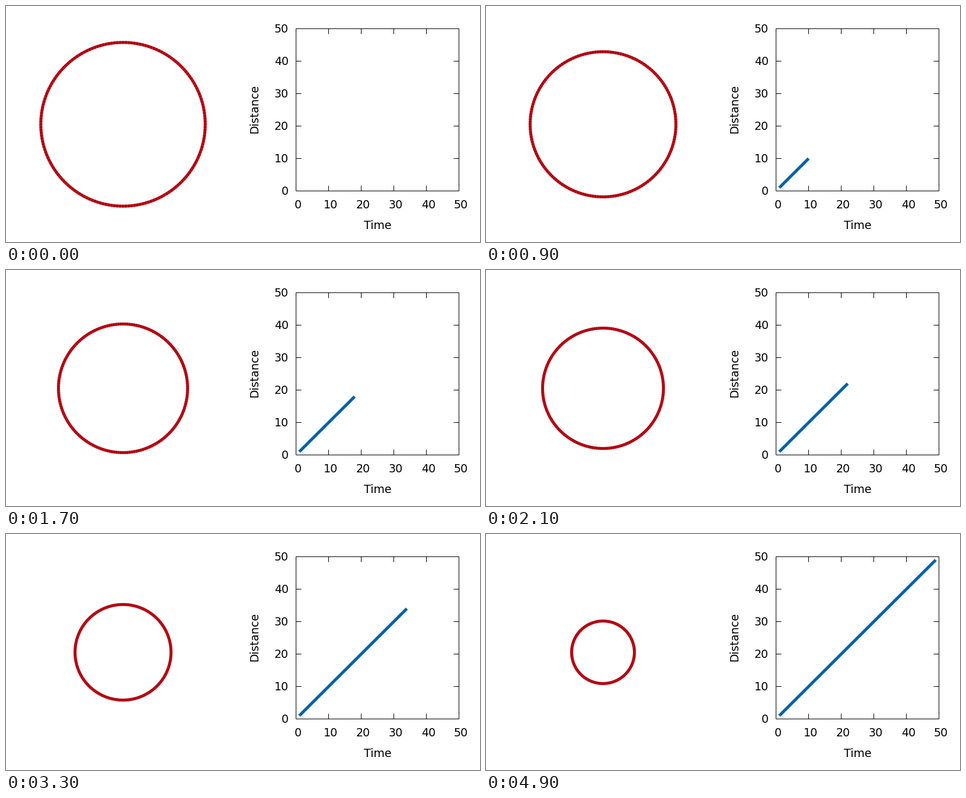
Animation, 800 px wide and 400 px high, one loop 5000 ms. Source, as a matplotlib script:

```python
import numpy as np
import matplotlib.pyplot as plt
from matplotlib.animation import FuncAnimation
from matplotlib.collections import LineCollection

DPI = 100
FRAMES, INTERVAL = 50, 100
LEFT, RIGHT, TOP, BOTTOM = 489.5, 764.5, 38.5, 313.5
UNIT = (RIGHT - LEFT) / 50
TICK = 9
CENTER = np.array([197.5, 200.5])
RED, DARK_RED, BLUE = "#bf0d18", "#930008", "#0060ad"

plt.rcParams["font.family"] = "DejaVu Sans"
plt.rcParams["font.size"] = 19 * 72 / DPI

fig = plt.figure(figsize=(8, 4), dpi=DPI, facecolor="white")
ax = fig.add_axes([0, 0, 1, 1])
ax.set(xlim=(0, 800), ylim=(400, 0))
ax.axis("off")


def px(width):
    return width * 72 / DPI


def stroke(xs, ys, color="black", width=1):
    return ax.plot(xs, ys, color=color, lw=px(width), solid_capstyle="butt",
                   solid_joinstyle="miter", snap=False)[0]


def label(x, y, text, ha="center", **kwargs):
    ax.text(x, y, text, ha=ha, va="baseline", **kwargs)


# Plot frame, ticks and labels
stroke([LEFT, RIGHT, RIGHT, LEFT, LEFT, RIGHT],
       [BOTTOM, BOTTOM, TOP, TOP, BOTTOM, BOTTOM])
for value in range(0, 51, 10):
    x, y = LEFT + value * UNIT, BOTTOM - value * UNIT
    label(x + 3.5, 343, str(value))
    label(477, y + 6.5, str(value), ha="right")
    if 0 < value < 50:
        stroke([x, x], [BOTTOM, BOTTOM - TICK])
        stroke([x, x], [TOP, TOP + TICK])
        stroke([LEFT, LEFT + TICK], [y, y])
        stroke([RIGHT, RIGHT - TICK], [y, y])
label(627, 378, "Time")
label(425, 175, "Distance", rotation=90, rotation_mode="anchor")

# Shrinking ring with fine radial hatching, and the growing line
angles = np.linspace(0, 2 * np.pi, 361)
directions = np.column_stack([np.cos(angles), np.sin(angles)])
ring = stroke([], [], RED, 5)
hatch = LineCollection([], colors=DARK_RED, capstyle="butt", snap=False)
ax.add_collection(hatch, autolim=False)
track = stroke([], [], BLUE, 5)


def update(frame):
    radius = 138.75 - 1.75 * frame
    ring.set_data(*(CENTER + radius * directions).T)
    spokes = directions[:-1:2]
    hatch.set_segments(np.stack([CENTER + (radius - 2.5) * spokes,
                                 CENTER + (radius + 2.5) * spokes], axis=1))
    hatch.set_linewidth(px(radius * 0.0085))
    end = min(frame + 1, 49)
    values = np.array([1, end]) if end > 1 else np.array([])
    track.set_data(LEFT + values * UNIT, BOTTOM - values * UNIT)
    return ring, hatch, track


anim = FuncAnimation(fig, update, frames=FRAMES, interval=INTERVAL,
                     repeat=True, repeat_delay=0)
plt.show()
```
